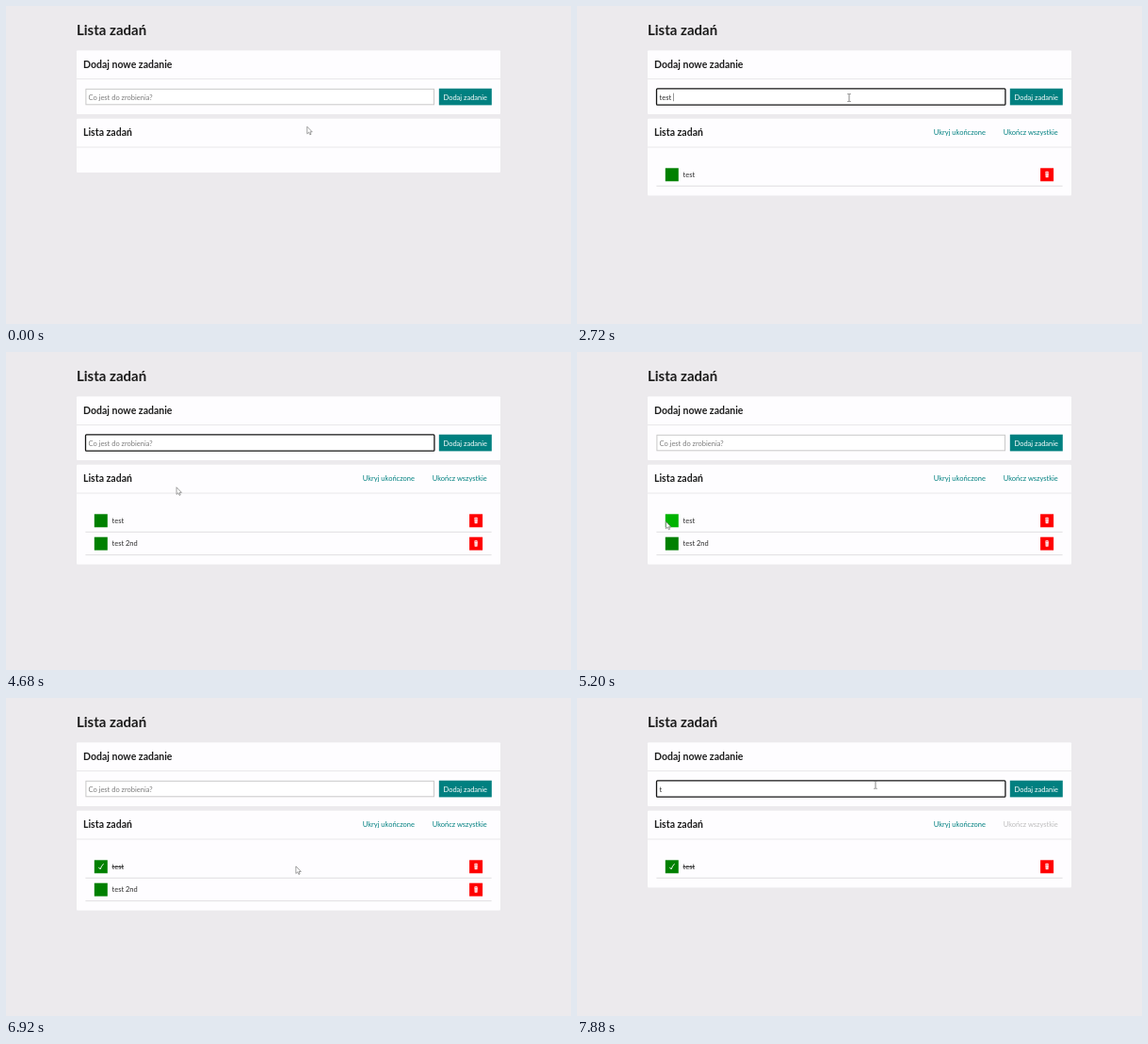
Animation, 600 px wide and 338 px high, one loop 8000 ms. Source, as an HTML page:

```html
<!DOCTYPE html>
<html lang="pl">
<head>
<meta charset="utf-8">
<title>Lista zadań</title>
<style>
  html, body { margin: 0; width: 100%; height: 100%; overflow: hidden; background: #eceaed; }
  svg { display: block; width: 600px; height: 338px; }
  text { font: 7.5px Lato, sans-serif; fill: #2b2b2b; white-space: pre; }
  .title { font-size: 15px; font-weight: 700; fill: #1c1c1c; }
  .head { font-size: 10.5px; font-weight: 700; fill: #1c1c1c; }
  .panel { fill: #fefdff; }
  .rule { stroke: #e9e8ea; stroke-width: 1; }
  .link { fill: #008080; }
  .hint { fill: #7a7a7a; }
  .done text { text-decoration: line-through; }
  .check { fill: none; stroke: #fff; stroke-width: .9; visibility: hidden; }
  .done .check { visibility: visible; }
</style>
</head>
<body>
<svg viewBox="0 0 600 338">
  <defs>
    <g id="bin">
      <path d="M-2 -2.6H2M-.7 -3.2H.7" stroke="#fff" stroke-width=".8"/>
      <path d="M-1.7 -1.9H1.7L1.4 3H-1.4Z" fill="#fff"/>
      <path d="M-.6 -1.2V2.3M.6 -1.2V2.3" stroke="#f77" stroke-width=".4"/>
    </g>
  </defs>
  <text class="title" x="75" y="31">Lista zadań</text>

  <rect class="panel" x="75" y="47.3" width="450" height="67.7" rx="1"/>
  <path class="rule" d="M75 77.5H525"/>
  <text class="head" x="82" y="66.2">Dodaj nowe zadanie</text>
  <rect id="field"/>
  <text class="hint" id="hint" x="87.5" y="99.5">Co jest do zrobienia?</text>
  <text id="typed" x="87.5" y="99.5"></text>
  <rect id="caret" y="92.6" width=".6" height="8.6" fill="#555"/>
  <rect x="459.8" y="87.7" width="56" height="17.7" fill="#008080"/>
  <text x="464.5" y="99.5" style="fill:#fff">Dodaj zadanie</text>

  <rect class="panel" id="list" x="75" y="119.8" width="450" rx="1"/>
  <path class="rule" d="M75 150H525"/>
  <text class="head" x="82" y="138.4">Lista zadań</text>
  <g id="links">
    <text class="link" x="378.8" y="137.3">Ukryj ukończone</text>
    <text class="link" id="finish" x="452.7" y="137.3">Ukończ wszystkie</text>
  </g>
  <g id="rows"></g>

  <path id="arrow" d="M0 0V7.6L1.8 6L3 8.6L4.2 8.1L3.1 5.6H5.4Z"
        fill="#fff" stroke="#777" stroke-width=".7"/>
  <path id="beam" d="M-1.7 -4H-.5L0 -3.5L.5 -4H1.7M0 -3.5V3.5M-1.7 4H-.5L0 3.5L.5 4H1.7"
        fill="none" stroke="#666" stroke-width=".8"/>
</svg>
<script>
  const LOOP = 8000, BLINK = 200, ROW = 24.4;
  const $ = id => document.getElementById(id);
  const set = (el, attrs) => { for (const k in attrs) el.setAttribute(k, attrs[k]); };
  const show = (el, on) => { el.style.visibility = on ? 'visible' : 'hidden'; };

  // [time, field text]
  const typing = [
    [0, ''], [560, 't'], [640, 'te'], [720, 'tes'], [840, 'test'], [1240, ''],
    [1920, 't'], [2000, 'te'], [2120, 'tes'], [2200, 'test'], [2720, 'test '],
    [3080, 'test 2'], [3120, 'test 2n'], [3200, 'test 2nd'], [3640, ''], [7680, 't']
  ];
  const focusSpans = [[360, 5120], [7560, LOOP]];
  const tasks = [
    { name: 'test', from: 1240, to: LOOP, done: 5240 },
    { name: 'test 2nd', from: 3640, to: 7240, done: Infinity }
  ];
  // [time, x, y] of the pointer tip
  const path = [
    [40, 319.8, 128.2], [340, 289, 97.5], [4260, 289, 97.5], [4640, 190, 140],
    [5080, 94.4, 180.2], [5580, 94.4, 180.2], [6240, 150, 174], [6700, 150, 174],
    [6920, 307, 178.8], [7140, 497, 203], [7280, 497, 203], [7540, 326, 100],
    [7880, 317, 92.3]
  ];

  const rows = tasks.map((task, i) => {
    const g = document.createElementNS('http://www.w3.org/2000/svg', 'g');
    g.setAttribute('transform', `translate(0 ${i * ROW})`);
    g.innerHTML = `
      <rect class="tick" x="93.8" y="172.3" width="14" height="14"/>
      <path class="check" d="M98.4 179.9L100.1 182Q101.3 178.4 103.6 176.3"/>
      <text x="112.5" y="181.8">${task.name}</text>
      <rect class="drop" x="492.1" y="172.3" width="14" height="14"/>
      <use href="#bin" x="499.1" y="179.3"/>
      <path class="rule" d="M84.4 191.3H515.6" style="stroke:#dfdee0"/>`;
    $('rows').append(g);
    return g;
  });

  function pointer(t) {
    const n = path.findIndex(p => p[0] > t);
    if (n === 0) return path[0].slice(1);
    if (n < 0) return path[path.length - 1].slice(1);
    const [a, x0, y0] = path[n - 1], [b, x1, y1] = path[n];
    const k = (t - a) / (b - a);
    return [x0 + (x1 - x0) * k, y0 + (y1 - y0) * k];
  }

  const inside = ([px, py], x, y, w, h) => px >= x && px <= x + w && py >= y && py <= y + h;

  function drawField(t) {
    const [since, text] = typing.filter(s => s[0] <= t).pop();
    const span = focusSpans.find(([a, b]) => t >= a && t < b);
    set($('field'), span
      ? { x: 84.5, y: 87.9, width: 370.4, height: 17.3, rx: 1, fill: '#fff', stroke: '#151515', 'stroke-width': 1.3 }
      : { x: 84.9, y: 88.3, width: 369.6, height: 16.5, rx: 0, fill: '#fff', stroke: '#c9c9c9', 'stroke-width': 1 });
    $('typed').textContent = text;
    show($('hint'), !text);
    const lit = span && Math.floor((t - Math.max(since, span[0])) / BLINK) % 2 === 0;
    show($('caret'), lit);
    if (lit) set($('caret'), { x: 87.5 + (text ? $('typed').getComputedTextLength() : 0) });
  }

  function drawList(t, tip) {
    let count = 0, open = 0;
    tasks.forEach((task, i) => {
      const on = t >= task.from && t < task.to, done = t >= task.done;
      const y = 172.3 + i * ROW, row = rows[i];
      row.style.display = on ? '' : 'none';
      row.classList.toggle('done', done);
      set(row.querySelector('.tick'), { fill: inside(tip, 93.8, y, 14, 14) ? '#00b300' : '#008000' });
      set(row.querySelector('.drop'), { fill: inside(tip, 492.1, y, 14, 14) ? '#ff4d4d' : '#ff0000' });
      if (on) { count++; if (!done) open++; }
    });
    set($('list'), { height: 57.2 + count * ROW });
    show($('links'), count);
    $('finish').style.fill = open ? '' : '#bdbdbd';
  }

  function draw(t) {
    const tip = pointer(t), typingArea = inside(tip, 84.4, 87.7, 370.6, 17.7);
    drawField(t);
    drawList(t, tip);
    show($('arrow'), !typingArea);
    show($('beam'), typingArea);
    set($(typingArea ? 'beam' : 'arrow'), { transform: `translate(${tip})` });
  }

  const start = performance.now();
  function tick() {
    draw((performance.now() - start) % LOOP);
    requestAnimationFrame(tick);
  }
  tick();
</script>
</body>
</html>
```
